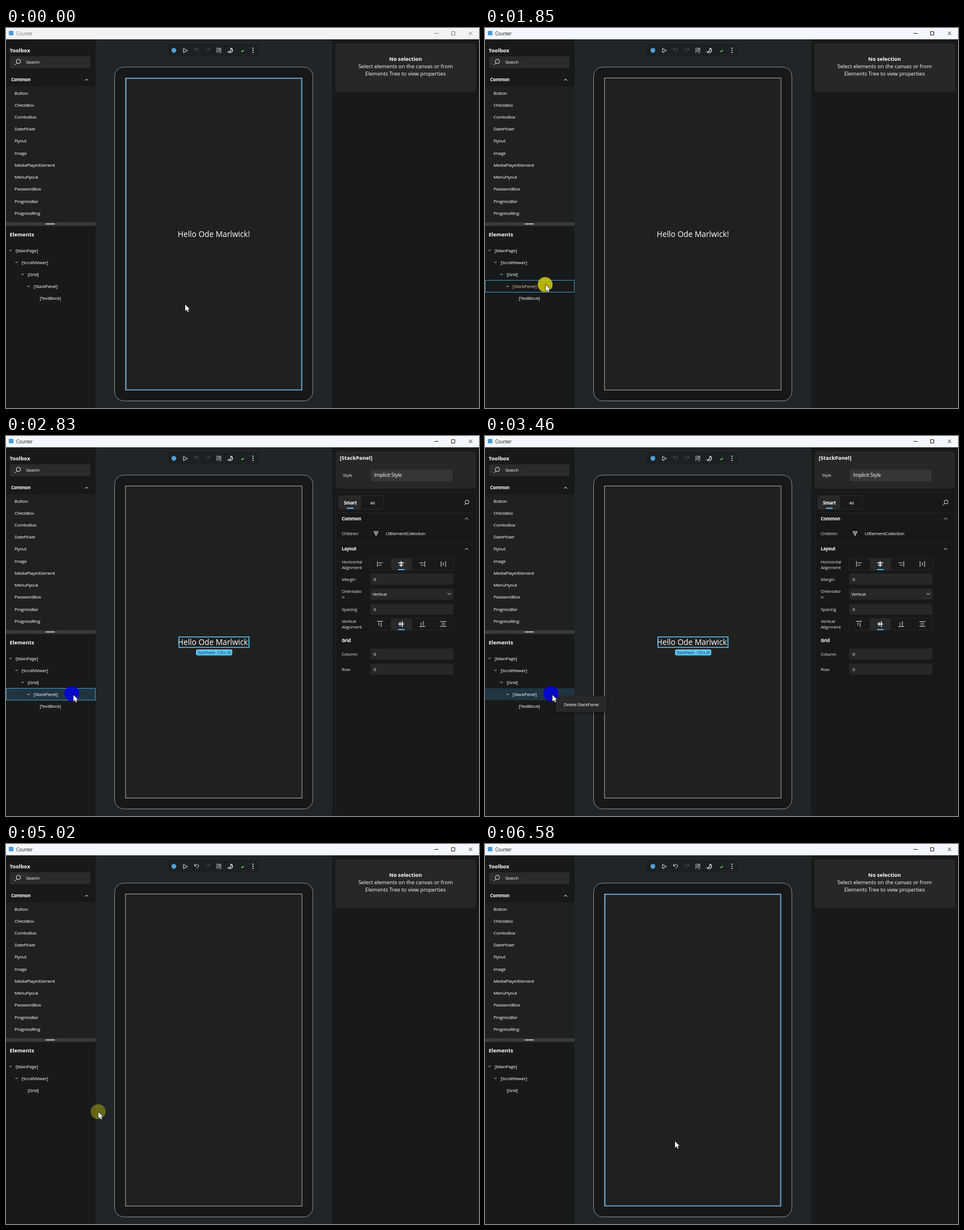
An HTML page with a canvas that plays this animation: 834x671 px, repeating every 6650 ms.

```html
<!DOCTYPE html>
<html lang="en">
<head>
<meta charset="utf-8">
<title>Counter</title>
<style>
html, body { margin: 0; width: 100%; height: 100%; overflow: hidden; background: #18191a; }
canvas { display: block; }
</style>
</head>
<body>
<canvas id="stage" width="834" height="671"></canvas>
<script>
const c = document.getElementById('stage').getContext('2d');
const LOOP = 6650, BLUE = '#5cc6fa', WHITE = '#fff';
const CLICK = 1550, SELECT = 2010, PANEL = 2070, RIGHT_CLICK = 2830, MENU = 2990,
      RELEASE = 3460, PRESS = 4380, DELETE = 4560;

// pointer stops: time, x, y
const POINTER = [
  [0, 316, 488.5], [60, 316, 488.5], [680, 112, 476], [740, 111, 474], [1020, 107, 453.5],
  [2010, 107, 453.5], [2070, 108, 454.5], [2780, 108, 454.5], [2830, 119, 457.5],
  [3460, 119, 457.5], [3910, 163, 473.5], [5640, 163, 473.5], [5700, 164, 474],
  [5820, 167, 475], [6290, 167, 475], [6580, 335, 525], [LOOP, 335, 525]
];
const TOOLS = ['Button', 'CheckBox', 'ComboBox', 'DatePicker', 'Flyout', 'Image',
  'MediaPlayerElement', 'MenuFlyout', 'PasswordBox', 'ProgressBar', 'ProgressRing'];
const TREE = ['[MainPage]', '[ScrollViewer]', '[Grid]', '[StackPanel]', '[TextBlock]'];

const clamp = v => Math.max(0, Math.min(1, v));

function text(s, x, y, size = 8, weight = 500, color = WHITE, align = 'left') {
  c.font = `${weight} ${size}px "Open Sans", "Noto Sans", sans-serif`;
  c.letterSpacing = size < 9.2 ? '-0.3px' : '0px';
  c.textAlign = align;
  c.fillStyle = color;
  c.fillText(s, x, y);
}

function box(x, y, w, h, fill, r = 0, stroke, width = 1) {
  c.beginPath();
  c.roundRect(x, y, w, h, r);
  if (fill) { c.fillStyle = fill; c.fill(); }
  if (stroke) { c.strokeStyle = stroke; c.lineWidth = width; c.stroke(); }
}

function disc(x, y, r, fill) {
  c.beginPath();
  c.arc(x, y, r, 0, 7);
  c.fillStyle = fill;
  c.fill();
}

function line(d, x, y, color = '#e8e8e8', width = 1) {
  c.save();
  c.translate(x, y);
  c.strokeStyle = color;
  c.lineWidth = width;
  c.stroke(new Path2D(d));
  c.restore();
}

const chevron = (x, y, size, dir) =>
  line(`M${-size} ${-dir * size / 2}L0 ${dir * size / 2}L${size} ${-dir * size / 2}`, x, y);

function magnifier(x, y, r) {
  line(`M${r} 0A${r} ${r} 0 1 1 ${-r} 0A${r} ${r} 0 1 1 ${r} 0M${-r * .7} ${r * .7}L${-r * 1.7} ${r * 1.7}`, x, y);
}

function clipped(x, y, w, h, dy, draw) {
  c.save();
  c.beginPath();
  c.rect(x, y, w, h);
  c.clip();
  c.translate(0, dy);
  draw();
  c.restore();
}

function pointerAt(t) {
  const i = POINTER.findIndex(p => p[0] > t);
  const [t0, x0, y0] = POINTER[i - 1], [t1, x1, y1] = POINTER[i];
  const u = (t - t0) / (t1 - t0), k = u * u * (3 - 2 * u);
  return [x0 + (x1 - x0) * k, y0 + (y1 - y0) * k];
}

function titleBar(t) {
  const on = clamp((t - CLICK) / 240), active = t >= CLICK;
  const g = Math.round(125 - 95 * on), ink = `rgb(${g},${g},${g})`;
  box(0, 0, 834, 20, active ? '#f4f8fd' : '#f3f3f3');
  box(5, 5, 8, 8, '#4d9bd6');
  text('Counter', 18, 13, 8.2, 400, ink);
  line('M-3.5 0H3.5', 759, 9.5, ink);
  line('M-3 -3H3V3H-3Z', 788.5, 9.5, ink);
  line('M-3 -3L3 3M3 -3L-3 3', 819, 9.5, ink);
}

function toolbox() {
  box(0, 20, 158, 651, '#18191a');
  text('Toolbox', 6.5, 42.5, 9.33, 700);
  box(7, 50, 142, 21, '#2a2b2c', 3);
  magnifier(22, 59, 3.8);
  text('Search', 35.5, 63);
  text('Common', 9, 94, 8, 700);
  chevron(142, 91.5, 3, -1);
  box(0, 103, 158, 240, '#1f2021');
  TOOLS.forEach((s, i) => text(s, 15, 117.6 + 21.22 * i));
  box(0, 343, 158, 6.5, '#38393a');
  box(70, 345.3, 16, 1.4, '#eee');
}

function tree(t, px, py) {
  text('Elements', 6.5, 367.8, 9.33, 700);
  const picked = t >= SELECT && t < DELETE;
  if (picked) box(0, 445.5, 158, 21, '#213540');
  if (t < RELEASE && px < 158) {
    if (py < 466.8) box(.5, 445.5, 157, 21, null, 0, '#4599c4');
    else if (py < 488) box(.5, 467, 157, 20.5, null, 0, '#4599c4');
  }
  const count = t < DELETE ? 5 : 3;
  for (let i = 0; i < count; i++) {
    const y = 392.6 + 21.2 * i, x = 10.6 * i;
    const pressed = i === 3 && t >= CLICK && t < SELECT;
    text(TREE[i], 17 + x, y + 2.9, 8, 500, pressed ? '#c9c6ad' : WHITE);
    if (i < count - 1) chevron(8 + x, y, 2, 1);
  }
}

function toolbar(t) {
  box(285, 28.5, 161, 21.5, '#1c2022', 3);
  disc(296, 39.5, 4.2, '#4aa3dc');
  line('M-3 -3.7L4 0L-3 3.7Z', 316, 39.8);
  const undo = 'M-3.5 -4V-.5H0M-3.3 -.8C-1 -5 4 -4 3.6 -.5C3.4 1.2 1.5 2.3 0 4';
  line(undo, 336, 39.5, t < DELETE ? '#55595b' : '#e8e8e8');
  c.save();
  c.translate(356, 39.5);
  c.scale(-1, 1);
  line(undo, 0, 0, '#4b4f51');
  c.restore();
  c.setLineDash([1.5, 1.2]);
  line('M-3.5 4V-4H4V4.5H0', 375, 39.3);
  c.setLineDash([]);
  magnifier(375.8, 38.8, 2.2);
  line('M1 -4C2 1 -1 3 -4 2.5C-2 5 4 4.5 4 -.5C4 -2.5 2.6 -3.7 1 -4Z', 395.5, 39.5, '#fff', 1.1);
  box(412, 35, 10, 10, '#17241b', 2);
  line('M-2 0L-.6 1.5L2.3 -1.5', 417, 40.5, '#8fe0a0', 1.2);
  for (const y of [35.8, 39.5, 43.2]) disc(435.5, y, 1.05, WHITE);
}

function device(t, px) {
  box(158, 20, 417, 651, '#202528');
  toolbar(t);
  box(191.5, 69, 349.5, 589.5, '#17181a', 16, '#8c8d8e');
  box(210.7, 88.3, 311.2, 551, '#1f2120', 0, '#949595', 1.2);
  if (px > 210) box(211.7, 89, 309.4, 550, null, 0, '#55a8d8', 1.4);
  if (t >= DELETE) return;
  text('Hello Ode Marlwick!', 366.5, 368.6, 13.7, 400, WHITE, 'center');
  if (t < PANEL) return;
  box(305, 354.7, 123.5, 18.6, null, 0, BLUE, 1.5);
  box(335, 376.8, 64, 10.6, BLUE, 3);
  text('StackPanel - 129 x 20', 367, 384.6, 6.67, 500, '#123448', 'center');
}

function field(label, y, value = '0') {
  const lines = [].concat(label);
  lines.forEach((s, i) => text(s, 592, y + 3 + (i - (lines.length - 1) / 2) * 10, 8, 500, '#e2e2e2'));
  if (value) {
    box(642, y - 9.8, 147, 19.6, '#262728', 2);
    text(value, value === '0' ? 648 : 646, y + 3);
  }
}

// four alignment glyphs, turned a quarter for the vertical row
function segments(y, turn) {
  box(641.5, y - 10.5, 148, 21, '#18191a', 2, '#272829');
  box(678.5, y - 10, 37, 20, '#28292a', 2);
  box(691, y + 8.5, 12, 1.8, BLUE, 1);
  const glyphs = ['M-4.5 -5V5M-2.5 -2H5M-2.5 2H2.5', 'M0 -5V5M-5 -2H5M-3.5 2H3.5',
    'M4.5 -5V5M2.5 -2H-5M2.5 2H-2.5', 'M-4 -5V5M4 -5V5M0 -3V3'];
  glyphs.forEach((d, i) => {
    c.save();
    c.translate(659.5 + 37.2 * i, y - .5);
    if (turn) c.rotate(Math.PI / 2);
    line(d, 0, 0, i === 1 ? WHITE : '#d5d5d5', i === 1 ? 1.5 : 1.1);
    c.restore();
  });
}

function layoutFields() {
  field(['Horizontal', 'Alignment'], 226.5, '');
  segments(226.5, false);
  field('Margin', 252.6);
  field(['Orientatio', 'n'], 279.3, 'Vertical');
  chevron(781.5, 278.8, 3, 1);
  field('Spacing', 305.7);
  field(['Vertical', 'Alignment'], 332.4, '');
  segments(332.4, true);
  text('Grid', 592, 364, 8, 700);
  field('Column', 385);
  field('Row', 411.7);
}

function properties(t) {
  box(575, 20, 259, 651, '#18191a');
  if (t < PANEL || t >= DELETE) {
    box(581, 27, 248, 86, '#272727', 5);
    text('No selection', 704.5, 57.6, 9.33, 700, WHITE, 'center');
    text('Select elements on the canvas or from', 704.5, 70.8, 9.33, 400, WHITE, 'center');
    text('Elements Tree to view properties', 704.5, 84.1, 9.33, 400, WHITE, 'center');
    return;
  }
  // expanders slide down with a strong deceleration
  const s = Math.cbrt(clamp((t - 2020) / 333)), rest = 1 - s * s * (3 - 2 * s);
  box(581.5, 27, 247, 66, '#272727', 5);
  text('[StackPanel]', 588.5, 42.2, 9.33, 700);
  text('Style', 594, 72.3, 8, 500, '#e2e2e2');
  box(643, 59.5, 144, 20.5, '#353637', 2);
  text('Implicit Style', 649, 72, 9, 400);
  box(581.5, 99.5, 247, 566, '#17181a', 5, '#212223');
  box(586.5, 105.5, 79, 24, '#18191a', 3, '#2a2b2c');
  box(587, 106, 39, 23, '#282929', 3);
  text('Smart', 607, 120.8, 8, 700, WHITE, 'center');
  text('All', 646, 120.8, 8, 500, WHITE, 'center');
  box(601, 126.6, 12, 1.8, BLUE, 1);
  magnifier(813, 116.5, 3.4);
  for (const y of [135, 188]) box(582, y, 246, 1, '#232425');
  text('Common', 592, 148.8, 8, 700);
  text('Layout', 592, 202.3, 8, 700);
  chevron(812, 146, 3, -1);
  chevron(812, 199.5, 3, -1);
  clipped(582, 157, 246, 31, -28 * rest, () => {
    text('Children', 592, 175.2, 8, 500, '#e2e2e2');
    line('M-4 -3.5H4L0 4ZM-2.5 -1H2.5M-2 -3.5L0 4L2 -3.5', 652.5, 172, '#d8d8d8', .8);
    text('UIElementCollection', 669.5, 175.2);
  });
  clipped(582, 210, 246, 455, -225 * rest, layoutFields);
}

function splitter(t, px) {
  const over = px > 158 && px < 167 && (t < 1000 || t >= 5700);
  if (!over) return;
  box(158, 20, 6.5, 651, BLUE);
  box(160.3, 339, 1.4, 15.5, '#23485a');
}

function menu(t) {
  if (t < MENU || t >= DELETE) return;
  c.save();
  c.shadowColor = 'rgba(0,0,0,.4)';
  c.shadowBlur = 5;
  c.shadowOffsetY = 2;
  box(124.5, 459.5, 90, 28, '#272829', 4);
  c.restore();
  if (pointerAt(t)[0] > 128) box(128.5, 465, 82.5, 17, '#4d4e4e', 3);
  text('Delete StackPanel', 139, 476.8);
}

function halo(t, from, fade, gone, x, y, rgb) {
  if (t < from || t >= gone) return;
  disc(x, y, 13.2, `rgba(${rgb},${.82 * (1 - clamp((t - fade) / (gone - fade)))})`);
}

function pointer(x, y) {
  const p = new Path2D('M0 0V11.2L2.6 8.8L4.4 12.8L6.3 12L4.5 8.1H8Z');
  c.save();
  c.translate(x, y);
  c.strokeStyle = '#111';
  c.lineWidth = 1.2;
  c.stroke(p);
  c.fillStyle = WHITE;
  c.fill(p);
  c.restore();
}

function frame(now) {
  const t = (now - start) % LOOP, [px, py] = pointerAt(t);
  device(t, px);
  properties(t);
  toolbox();
  tree(t, px, py);
  splitter(t, px);
  titleBar(t);
  menu(t);
  halo(t, CLICK, SELECT, 2370, 106, 453, '216,211,0');
  halo(t, RIGHT_CLICK, RELEASE + 60, 3910, 116, 454.7, '0,0,232');
  halo(t, PRESS, 4960, 5080, 162.5, 472.7, '216,211,0');
  pointer(px, py);
  requestAnimationFrame(frame);
}

const start = performance.now();
requestAnimationFrame(() => frame(performance.now()));
</script>
</body>
</html>
```
